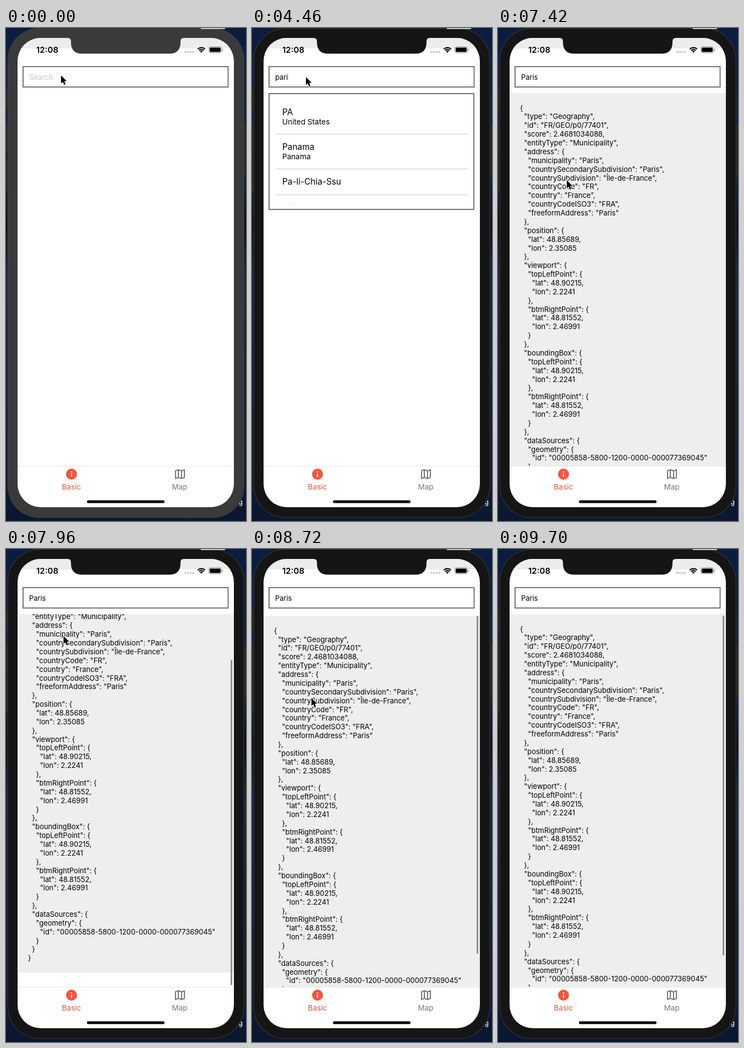
Animation, 436 px wide and 894 px high, one loop 9900 ms. Source, as an HTML page with a canvas:

```html
<!DOCTYPE html>
<html lang="en">
<head>
<meta charset="utf-8">
<title>Place search</title>
<style>
html, body { margin: 0; width: 100%; height: 100%; overflow: hidden; background: #0a1a38; }
canvas { display: block; }
</style>
</head>
<body>
<canvas id="stage" width="436" height="894"></canvas>
<script>
const c = document.getElementById('stage').getContext('2d');
const LOOP = 9900, GRAY = '#747474', RED = '#f4553d';

// Each key is [time, ...values]; values ease between neighbouring keys.
const CURSOR = [[940, 100, 86], [1020, 98, 89], [4800, 98, 89], [5660, 93, 155], [6240, 93, 155],
  [6280, 94, 156], [6780, 94, 156], [7400, 125, 276], [7440, 125, 276], [8060, 103, 149],
  [8720, 108, 270], [8780, 108, 270], [9460, 140, -22]];
const DRAG = [[7440, 0], [8060, 127], [8720, -7], [8800, 0]];
const CARET = [[960, 0], [1020, 1], [1580, 1], [1800, 0], [2020, 0], [2040, 1], [2900, 1], [3000, 0],
  [3020, 1], [3860, 1], [4000, 0], [4420, 0], [4620, 1], [5000, 1], [5150, 0], [5500, 0], [5650, 1]];
const BEZEL = [[660, 58], [780, 21]];
const TYPED = [[2040, 'p'], [2420, 'pa'], [3020, 'par'], [3180, 'pari'], [6560, 'Paris']];

const LIST_AT = 3900, REFINED_AT = 4580, PRESS_AT = 6420, RESULT_AT = 6560;
const FIRST_LIST = [['PA', 'United States'], ['Panama', 'Panama'], ['Pa-li-Chia-Ssu']];
const REFINED_LIST = [['Paris', 'France'], ['Paris', 'United States'], ['Paris', 'Canada']];

const box = {
  topLeftPoint: { lat: 48.90215, lon: 2.2241 },
  btmRightPoint: { lat: 48.81552, lon: 2.46991 }
};
const RESULT = JSON.stringify({
  type: 'Geography',
  id: 'FR/GEO/p0/77401',
  score: 2.4681034088,
  entityType: 'Municipality',
  address: {
    municipality: 'Paris',
    countrySecondarySubdivision: 'Paris',
    countrySubdivision: 'Île-de-France',
    countryCode: 'FR',
    country: 'France',
    countryCodeISO3: 'FRA',
    freeformAddress: 'Paris'
  },
  position: { lat: 48.85689, lon: 2.35085 },
  viewport: box,
  boundingBox: box,
  dataSources: { geometry: { id: '00005858-5800-1200-0000-000077369045' } }
}, null, 2).split('\n');

const MAP_ICON = new Path2D('M20.5 3l-.16.03L15 5.1 9 3 3.36 4.9c-.21.07-.36.25-.36.48V20.5c0 .28.22.5.5.5l.16-.03L9 18.9l6 2.1 5.64-1.9c.21-.07.36-.25.36-.48V3.5c0-.28-.22-.5-.5-.5zM10 5.47l4 1.4v11.66l-4-1.4zM5 6.46l3-1.01v11.7l-3 1.16zM19 17.54l-3 1.01V6.86l3-1.16z');
const ARROW = new Path2D('M0 0V14.6L3.3 11.5 5.6 16.9 8.2 15.8 5.9 10.5H10.4Z');
const NOTCH = new Path2D('M112 17V18Q118 18 118 24V26Q118 46.5 138 46.5H297Q317 46.5 317 26V24Q317 18 323 18V17Z');

function tween(keys, t) {
  const i = keys.findIndex(k => k[0] > t);
  if (i === 0) return keys[0].slice(1);
  if (i < 0) return keys[keys.length - 1].slice(1);
  const a = keys[i - 1], b = keys[i];
  const u = (t - a[0]) / (b[0] - a[0]), e = u * u * (3 - 2 * u);
  return a.slice(1).map((v, j) => v + (b[j + 1] - v) * e);
}

function rect(x, y, w, h, fill, r = 0) {
  c.fillStyle = fill;
  c.beginPath();
  c.roundRect(x, y, w, h, r);
  c.fill();
}

function disc(x, y, r, fill) {
  rect(x - r, y - r, 2 * r, 2 * r, fill, r);
}

function frame(x, y, w, h) {
  c.strokeStyle = GRAY;
  c.lineWidth = 2;
  c.strokeRect(x + 1, y + 1, w - 2, h - 2);
}

function text(s, x, y, size, fill = '#000', align = 'left', weight = 400) {
  c.font = `${weight} ${size}px Inter, "Liberation Sans", sans-serif`;
  c.textAlign = align;
  c.fillStyle = fill;
  c.fillText(s, x, y);
}

function clipped(x, y, w, h, r, draw) {
  c.save();
  c.beginPath();
  c.roundRect(x, y, w, h, r);
  c.clip();
  draw();
  c.restore();
}

function drawPhone(t) {
  const sky = c.createLinearGradient(0, 0, 0, 894);
  [[0, '#0a1c40'], [0.3, '#0b2147'], [0.4, '#060c18'], [0.5, '#12284c'], [0.7, '#0a1f42'], [1, '#0a1730']]
    .forEach(([p, col]) => sky.addColorStop(p, col));
  rect(0, 0, 436, 894, sky);
  text('g', 422.5, 864, 12, '#ddd', 'left', 600);
  [[0, 113, 33], [0, 173, 57], [0, 239, 57], [431, 174, 95]]
    .forEach(([x, y, h]) => rect(x, y, 5, h, '#272727', 1));
  const v = Math.round(tween(BEZEL, t)[0]);
  rect(2.5, 0, 430.5, 888.5, v > 40 ? '#3a3a3a' : '#303030', 58);
  rect(4, 1.5, 427.5, 885.5, `rgb(${v},${v},${v})`, 56.5);
  rect(354, 0, 44, 2, '#c8c8c8');
  rect(21, 18, 393, 851, '#fff', 42);
}

function drawStatus(t) {
  clipped(21, 18, 393, 851, 42, () => rect(21, 18, 393, 19, '#ececec'));
  const v = Math.round(tween(BEZEL, t)[0]);
  c.fillStyle = `rgb(${v},${v},${v})`;
  c.fill(NOTCH);
  text('12:08', 75, 45, 15, '#000', 'center', 600);
  for (let i = 0; i < 4; i++) disc(325.8 + 4.8 * i, 43.3, 1.9, '#c9c9c9');
  c.strokeStyle = c.fillStyle = '#000';
  c.lineWidth = 2.2;
  for (const r of [5.8, 9.4]) {
    c.beginPath();
    c.arc(355, 45, r, -Math.PI * 0.75, -Math.PI * 0.25);
    c.stroke();
  }
  c.beginPath();
  c.moveTo(355, 45);
  c.arc(355, 45, 3.5, -Math.PI * 0.75, -Math.PI * 0.25);
  c.fill();
  c.strokeStyle = '#8a8a8a';
  c.lineWidth = 1;
  c.beginPath();
  c.roundRect(368.5, 34, 23, 11, 3.2);
  c.stroke();
  rect(370, 35.5, 20, 8, '#000', 1.8);
  rect(392.6, 37.7, 1.4, 3.8, '#8a8a8a', 1);
}

function drawTabs() {
  rect(21, 794, 393, 1, '#e6e6e6');
  disc(119, 809, 10, RED);
  rect(118, 804, 2, 2, '#fff');
  rect(118, 808, 2, 6, '#fff');
  c.save();
  c.translate(304, 797);
  c.fillStyle = GRAY;
  c.fill(MAP_ICON, 'evenodd');
  c.restore();
  text('Basic', 119, 836.7, 13.6, '#d6573d', 'center');
  text('Map', 315.5, 836.7, 13.6, '#777', 'center');
  rect(147, 856.5, 141, 5, '#000', 2.5);
}

function drawField(t) {
  frame(30, 69, 374.5, 39);
  const typed = TYPED.filter(k => k[0] <= t).pop();
  const query = typed ? typed[1] : '';
  text(query || 'Search', 42, 93.6, 12.9, query ? '#000' : '#c3c3c5');
  if (t < RESULT_AT) {
    const x = 42 + (query && c.measureText(query).width);
    c.globalAlpha = tween(CARET, t)[0];
    rect(x - 0.3, 80.5, 1.9, 16.5, '#3f66d9', 1);
    c.globalAlpha = 1;
  }
}

function drawList(t) {
  frame(30, 118, 374, 212);
  const refined = t >= REFINED_AT;
  clipped(40, 128, 354, 191, 0, () => {
    let y = 129;
    (refined ? REFINED_LIST : FIRST_LIST).forEach(([name, country], i) => {
      const h = country ? 63 : 46.5;
      c.globalAlpha = i === 0 && t >= PRESS_AT ? 0.2 : 1;
      text(name, 55, y + 29, 15.4);
      if (country) text(country, 55, y + 46.4, 13.6);
      rect(42, Math.round(y + h), 350.5, 1, '#cbcbcb');
      c.globalAlpha = 1;
      y += h;
    });
    if (!refined) rect(74, 318, 2, 1, '#bbb');
  });
}

function drawResult(t) {
  const drag = tween(DRAG, t)[0], max = 60;
  const inside = Math.min(Math.max(drag, 0), max);
  const over = (drag - inside) * 0.44, scroll = inside + over;
  clipped(21, 118, 393, 676, 0, () => {
    rect(21, 118 - scroll, 393, 736, '#eee');
    RESULT.forEach((line, i) => text(line, 40, 149.6 + 15.87 * i - scroll, 12.9));
    if (t > 7440) {
      const top = 121 + inside * 0.9 + Math.max(over, 0);
      rect(408, top, 3, 616 - Math.abs(over), '#909090', 1.5);
    }
  });
}

function drawCursor(t) {
  const [x, y] = tween(CURSOR, t);
  c.save();
  c.translate(x, y);
  c.lineJoin = 'round';
  c.lineWidth = 2;
  c.strokeStyle = '#fff';
  c.stroke(ARROW);
  c.fillStyle = '#000';
  c.fill(ARROW);
  c.restore();
}

function render(now) {
  const t = now % LOOP;
  drawPhone(t);
  drawStatus(t);
  drawField(t);
  if (t >= RESULT_AT) drawResult(t);
  else if (t >= LIST_AT) drawList(t);
  drawTabs();
  drawCursor(t);
}

const start = performance.now();
(function tick() {
  render(performance.now() - start);
  requestAnimationFrame(tick);
})();
</script>
</body>
</html>
```
